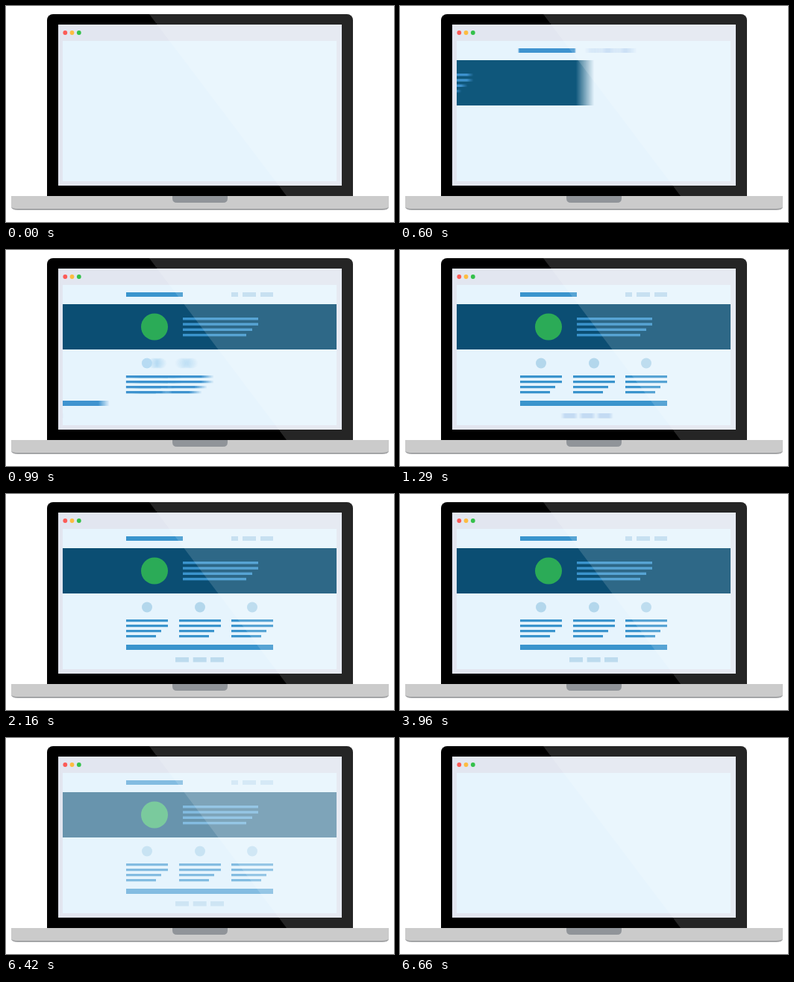
An HTML page with a canvas for the animation above (7.2 s loop, 520 by 291 pixels).

```html
<!DOCTYPE html>
<html lang="en">
<head>
<meta charset="utf-8">
<title>Laptop page build</title>
<style>
  html, body { margin: 0; width: 100%; height: 100%; overflow: hidden; background: #fff; }
  svg, canvas { position: absolute; left: 0; top: 0; width: 520px; height: 291px; display: block; }
</style>
</head>
<body>
<svg viewBox="0 0 520 291">
  <path d="M55 256V19a8 8 0 0 1 8-8H457a8 8 0 0 1 8 8V256Z" fill="#000"/>
  <rect x="70" y="25" width="380" height="217" fill="#e2e6f0"/>
  <rect x="76" y="47" width="367" height="189" fill="#e6f4fd"/>
  <circle cx="79.3" cy="36" r="2.9" fill="#fc5b57"/>
  <circle cx="88.5" cy="36" r="2.9" fill="#fdbc40"/>
  <circle cx="97.8" cy="36" r="2.9" fill="#34c14a"/>
  <path d="M7 256H513V271Q512 275 504 275H16Q8 275 7 271Z" fill="#a3a4a6"/>
  <path d="M7 256H513V271Q510 273 504 273H16Q10 273 7 271Z" fill="#cbcbcb"/>
  <path d="M223 256H297V259Q297 265 291 265H229Q223 265 223 259Z" fill="#909499"/>
</svg>
<canvas id="page"></canvas>
<svg viewBox="0 0 520 291">
  <path d="M192 11H457a8 8 0 0 1 8 8V256H376Z" fill="#fff" fill-opacity=".145"/>
</svg>
<script>
const LOOP = 7200, STEP = 30, SLIDE = 350, SHUTTER = 15, SAMPLES = 12;
const W = 520, H = 291, LEFT = 76;
const BLUE = '#3a94cd', PALE = '#bddbee', NAVY = '#0b4e73', GREEN = '#2bab57';

const canvas = document.getElementById('page');
const layer = document.createElement('canvas');
const scale = window.devicePixelRatio || 1;
for (const c of [canvas, layer]) {
  c.width = Math.round(W * scale);
  c.height = Math.round(H * scale);
}
const out = canvas.getContext('2d');
const pen = layer.getContext('2d');

function box(color, x, y, w, h) {
  pen.fillStyle = color;
  pen.fillRect(x, y, w, h);
}

function dot(color, x, y, r) {
  pen.fillStyle = color;
  pen.beginPath();
  pen.arc(x, y, r, 0, Math.PI * 2);
  pen.fill();
}

function lines(x, y, pitch, h, widths) {
  widths.forEach((w, i) => box(BLUE, x, y + i * pitch, w, h));
}

function column(x) {
  dot('#b3d7ec', x + 28, 152.5, 7);
  lines(x, 169, 7, 3.2, [56, 56, 47, 40]);
}

// Each part slides in from beyond the page's left edge.
const parts = [
  { start: 275, right: 237, draw: () => box(BLUE, 161, 57, 76, 6) },
  { start: 344, right: 358, draw: () => {
    box(PALE, 302, 57, 9, 6);
    box(PALE, 317, 57, 18, 6);
    box(PALE, 341, 57, 17, 6);
  } },
  { start: 432, right: 443, draw: () => box(NAVY, 76, 73, 367, 61) },
  { start: 541, right: 338, draw: () => {
    dot(GREEN, 199, 103.5, 18);
    lines(237, 91, 7.3, 3.4, [101, 101, 93, 85]);
  } },
  { start: 645, right: 217, draw: () => column(161) },
  { start: 762, right: 288, draw: () => column(232) },
  { start: 772, right: 358, draw: () => column(302) },
  { start: 888, right: 358, draw: () => box(BLUE, 161, 203, 197, 7) },
  { start: 985, right: 292, draw: () => {
    for (const x of [227, 250.7, 274]) box(PALE, x, 220, 18, 6.5);
  } }
];

const clamp = v => Math.min(1, Math.max(0, v));

function offset(part, t) {
  const p = clamp((t - part.start) / SLIDE);
  return (LEFT - part.right) * (1 + Math.cos(Math.PI * p)) / 2;
}

// Average several moments within the shutter to get motion blur.
function drawPart(part, t) {
  const moving = Math.abs(offset(part, t + SHUTTER / 2) - offset(part, t - SHUTTER / 2)) > 0.2;
  const n = moving ? SAMPLES : 1;
  pen.setTransform(1, 0, 0, 1, 0, 0);
  pen.clearRect(0, 0, layer.width, layer.height);
  pen.globalCompositeOperation = 'lighter';
  pen.globalAlpha = 1 / n;
  for (let i = 0; i < n; i++) {
    const dx = offset(part, t + ((i + 0.5) / n - 0.5) * SHUTTER);
    pen.setTransform(scale, 0, 0, scale, dx * scale, 0);
    part.draw();
  }
  out.drawImage(layer, 0, 0, W, H);
}

function render(time) {
  const t = Math.floor((time % LOOP) / STEP) * STEP;
  out.setTransform(scale, 0, 0, scale, 0, 0);
  out.globalAlpha = 1;
  out.clearRect(0, 0, W, H);
  canvas.style.opacity = 1 - clamp((t - 6240) / 420);
  out.save();
  out.beginPath();
  out.rect(LEFT, 47, 367, 189);
  out.clip();
  for (const part of parts) if (t > part.start) drawPart(part, t);
  out.restore();
}

const began = performance.now();
function tick() {
  render(performance.now() - began);
  requestAnimationFrame(tick);
}
tick();
</script>
</body>
</html>
```
